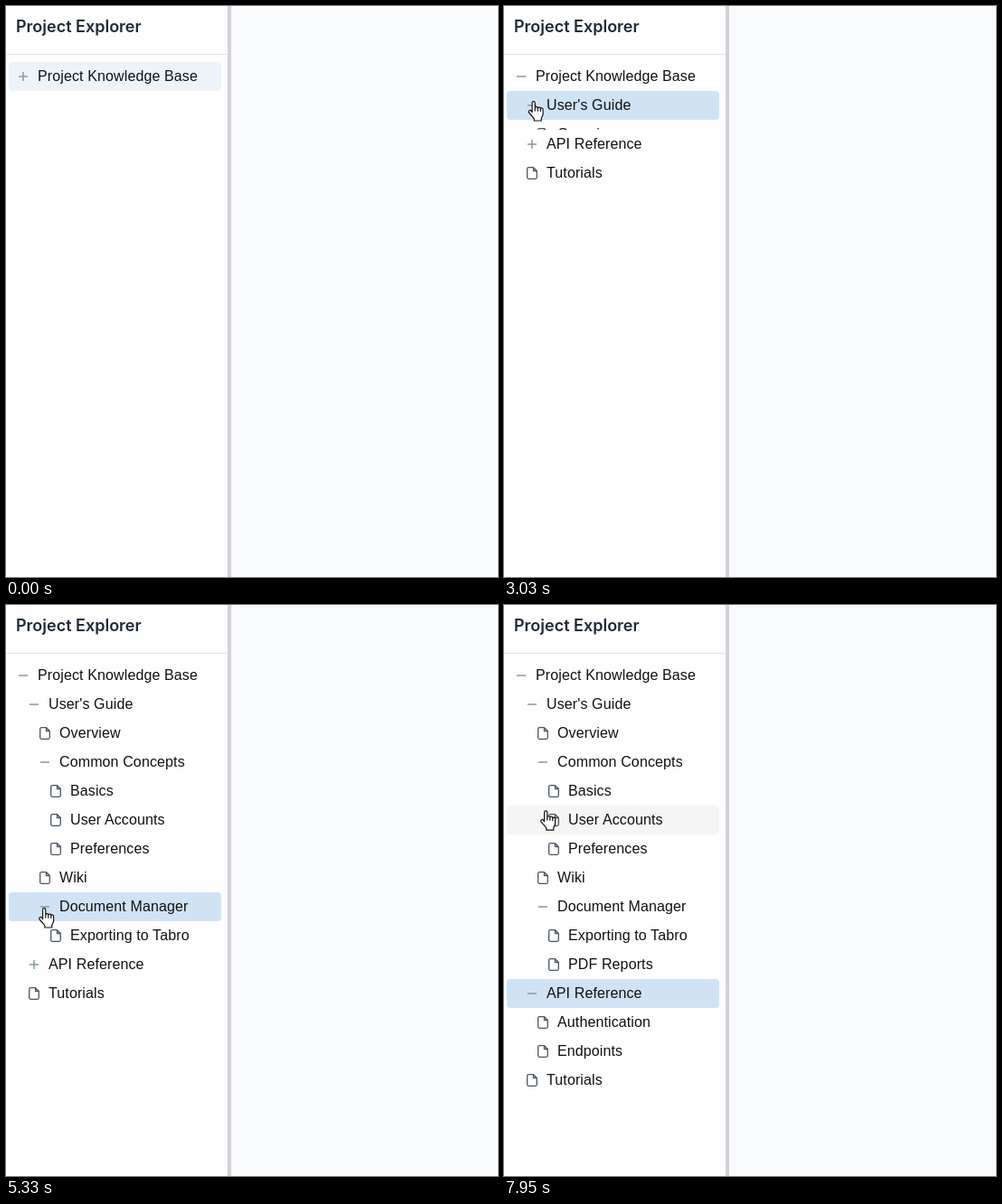
Animation of 544x632 px, one loop 8000 ms. Source, as an HTML page:

```html
<!DOCTYPE html>
<html lang="en">
<head>
<meta charset="utf-8">
<title>Project Explorer</title>
<style>
  html, body { margin: 0; width: 100%; height: 100%; overflow: hidden; background: #f9fafc; }
  #stage { position: relative; width: 544px; height: 632px; overflow: hidden; }
  #panel { position: absolute; left: 0; top: 0; width: 245px; height: 632px; background: #fefefe; border-right: 4px solid #d1d2da; }
  h1 { margin: 0; height: 53px; padding-left: 11px; border-bottom: 1px solid #e3e5e9;
       font: 600 18px/46px Inter, sans-serif; color: #1f2937; white-space: nowrap; }
  #tree { position: absolute; left: 3px; top: 62px; width: 235px; color: #111;
          font: 16px/32px "Liberation Sans", Arial, sans-serif; letter-spacing: .12px; }
  .row { position: relative; height: 32px; border-radius: 4px; white-space: nowrap; }
  .row svg { position: absolute; top: 8px; width: 16px; height: 16px; fill: none; }
  .kids { overflow: hidden; }
  .sign { stroke: #8799a6; stroke-width: 1.5; }
  .file { stroke: #4b5563; stroke-width: 1.3; stroke-linejoin: round; }
  #cursor { position: absolute; left: 0; top: 0; width: 24px; height: 28px; overflow: visible;
            fill: #fff; stroke: #111; stroke-width: 1.2; stroke-linejoin: round; }
</style>
</head>
<body>
<div id="stage">
  <div id="panel">
    <h1>Project Explorer</h1>
    <div id="tree"></div>
  </div>
  <svg id="cursor">
    <path id="arrow" d="M.5.5V16.2L4 12.9 6.5 18.5 8.8 17.5 6.4 12H11.3Z"/>
    <g id="hand" transform="translate(-7 0)">
      <path d="M4.6 12.6V2.3a1.6 1.6 0 0 1 3.2 0V8a1.5 1.5 0 0 1 3 .3 1.5 1.5 0 0 1 3 .7 1.4 1.4 0 0 1 2.8.9V15.5L14.8 19V22H6.8V19.6L1.1 13a1.6 1.6 0 0 1 2.3-2.2Z"/>
      <path d="M7.8 8V11.5M10.8 8.3V11.7M13.8 9V12" fill="none"/>
    </g>
  </svg>
</div>
<script>
const LOOP = 8000, ENTER = 180, STEP = 68;
const ROW = 32, TOP = 62, INDENT = 12;
const OPEN_DELAY = 102, OPEN_TIME = 230, HOVER_LAG = 70;

// Branches are [label, click time, children]; leaves are plain labels.
const data = ["Project Knowledge Base", 1740, [
  ["User's Guide", 2890, [
    "Overview",
    ["Common Concepts", 4260, ["Basics", "User Accounts", "Preferences"]],
    "Wiki",
    ["Document Manager", 5130, ["Exporting to Tabro", "PDF Reports"]]
  ]],
  ["API Reference", 6300, ["Authentication", "Endpoints"]],
  "Tutorials"
]];

// Pointer moves: start, end, x, y
const moves = [
  [ENTER, 315, 217, 268],
  [460, 1060, 23, 84.5],
  [2360, 2640, 33.5, 105],
  [3290, 3680, 42, 176],
  [4560, 4680, 54, 207],
  [4680, 5060, 43, 335],
  [5520, 5930, 33, 431],
  [6690, 6910, 41, 506],
  [7070, 7545, 51, 268],
  [7690, 7940, 47, 227]
];

const FILE = "M1.5-6.3H-3.8A1.5 1.5 0 0 0-5.3-4.8V4.8A1.5 1.5 0 0 0-3.8 6.3H3.8A1.5 1.5 0 0 0 5.3 4.8V-2.5L1.5-6.3V-2.5H5.3";
const MINUS = "M-5 0H5", PLUS = MINUS + "M0-5V5";
const $ = id => document.getElementById(id);
const clamp = p => Math.min(1, Math.max(0, p));
const swing = p => 0.5 - Math.cos(Math.PI * clamp(p)) / 2;
const branches = [];

function build(item, level, parent) {
  const leaf = typeof item === "string";
  const [label, click, children] = leaf ? [item, Infinity, []] : item;
  const row = document.createElement("div");
  const kids = document.createElement("div");
  row.className = "row";
  kids.className = "kids";
  row.style.paddingLeft = 32 + INDENT * level + "px";
  row.innerHTML = `<svg viewBox="-8 -8 16 16" style="left:${8 + INDENT * level}px">` +
    `<path class="${leaf ? "file" : "sign"}" d="${leaf ? FILE : PLUS}"/></svg>`;
  row.append(label);
  parent.append(row, kids);
  const node = { leaf, click, row, kids, icon: row.querySelector("path") };
  if (!leaf) branches.push(node);
  node.children = children.map(c => build(c, level + 1, kids));
  return node;
}

const root = build(data, 0, $("tree"));
branches.sort((a, b) => a.click - b.click);

function pointer(t) {
  let x = 413, y = 557;
  for (const [start, end, toX, toY] of moves) {
    const p = swing((t - start) / (end - start));
    x += (toX - x) * p;
    y += (toY - y) * p;
  }
  return [x, y];
}

// Lays out a node at y and returns its full height.
function layout(node, y, t, selected, [px, py]) {
  const over = px >= 3 && px < 238 && py >= y && py < y + ROW;
  node.row.style.background =
    node === selected ? (t < node.click ? "#ecf4fa" : "#d0e3f5") : over ? "#f5f5f5" : "";
  if (node.leaf) return ROW;
  const open = swing((t - node.click - OPEN_DELAY) / OPEN_TIME);
  node.icon.setAttribute("d", open > 0 ? MINUS : PLUS);
  let full = 0;
  for (const child of node.children)
    full += layout(child, y + ROW + full, t, selected, open > 0 ? [px, py] : []);
  const height = Math.round(full * open);
  node.kids.style.height = height + "px";
  return ROW + height;
}

// The picture advances in even steps, about 15 per second.
const snap = t => Math.max(0, ENTER + Math.floor((t - ENTER) / STEP + 0.3) * STEP);

function draw(now) {
  const t = snap(now % LOOP);
  const selected = branches.filter(n => n.click <= t).pop() || root;
  const height = layout(root, TOP, t, selected, pointer(t - HOVER_LAG));
  const [x, y] = pointer(t);
  const onRow = x < 238 && y >= TOP && y < TOP + height;
  $("cursor").style.display = t < ENTER ? "none" : "";
  $("cursor").style.transform = `translate(${x}px, ${y}px)`;
  $("hand").style.display = onRow ? "" : "none";
  $("arrow").style.display = onRow ? "none" : "";
}

const begin = performance.now();
function tick() {
  draw(performance.now() - begin);
  requestAnimationFrame(tick);
}
tick();
</script>
</body>
</html>
```
